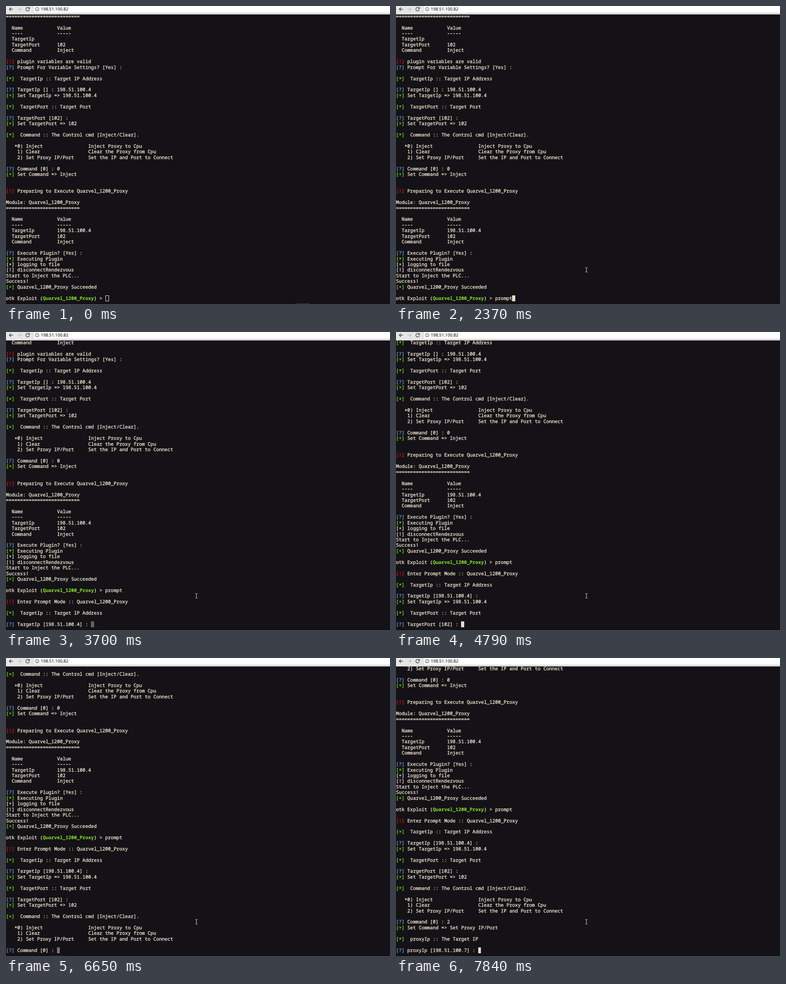
Recreate the animation shown at these times as an HTML page. Size 850 by 658 pixels, loop 8 s.

```html
<!DOCTYPE html>
<html lang="en">
<head>
<meta charset="utf-8">
<title>Terminal</title>
<style>
  html, body { margin: 0; width: 100%; height: 100%; overflow: hidden; background: #141216; }
  #stage { position: absolute; left: 0; top: 0; width: 850px; height: 658px; overflow: hidden; background: #141216; }
  #term, #caret {
    position: absolute;
    font: 500 10.46px/12.44px "Noto Sans Mono", "DejaVu Sans Mono", monospace;
    font-variant-ligatures: none;
    text-rendering: geometricPrecision;
    color: #f7ead6;
  }
  #term { left: 0; bottom: 6px; width: 850px; white-space: pre; -webkit-text-stroke: 0.3px currentColor; }
  .row { height: 12.44px; }
  .row b { color: #86e62f; font-weight: 700; -webkit-text-stroke: 0; }
  .row i { font-style: normal; position: relative; top: 1.6px; }
  .ask { color: #6ea3dc; }
  .good { color: #74e32c; }
  .warn { color: #d81616; }
  #caret { bottom: 6px; width: 6.4px; height: 13px; box-sizing: border-box; }
  #caret.idle { width: 8px; border: 1px solid #e8dccb; }
  #fill { width: 100%; height: 100%; background: #e8dccb; }
  #edge { position: absolute; left: 0; bottom: 0; width: 850px; height: 1px; background: #0a090b; }
  #tab { position: absolute; top: 0; width: 31px; height: 1px; }
  #mouse { position: absolute; left: -4px; top: -7px; }
  #bar { position: absolute; left: 0; top: 0; width: 850px; height: 19px; background: #e6e6e6; border-bottom: 1px solid #949494; box-sizing: border-box; }
  #field { position: absolute; left: 60px; top: -6px; width: 800px; height: 22px; background: #fff; border: 1px solid #cbcbcb; border-radius: 3px; box-sizing: border-box; }
  #bar svg { position: absolute; left: 0; top: 0; }
  #address { position: absolute; left: 77px; top: 0; font: 9.4px/14px "Open Sans", "Noto Sans", sans-serif; text-rendering: geometricPrecision; color: #1c1c1c; -webkit-text-stroke: 0.15px currentColor; }
</style>
</head>
<body>
<div id="stage">
  <div id="term"></div>
  <div id="caret"><div id="fill"></div></div>
  <div id="edge"><div id="tab"></div></div>
  <svg id="mouse" width="9" height="13" fill="none" stroke="#d8d8d8">
    <path d="M2 1.5H4M5 1.5H7M4.5 2V11M2 11.5H4M5 11.5H7"/>
  </svg>
  <div id="bar">
    <div id="field"></div>
    <svg width="76" height="18" fill="none" stroke="#484848" stroke-width="1.4">
      <path d="M15.5 7H7.5M11 3.3L7.3 7L11 10.7"/>
      <path stroke="#c2c2c2" d="M25.5 7H33.5M30 3.3L33.7 7L30 10.7"/>
      <path d="M51 4.4A4 4 0 1 0 51.7 8.2"/>
      <path fill="#484848" stroke="none" d="M52.6 2V6.4H48.2Z"/>
      <circle cx="69" cy="7" r="4" stroke-width="1"/>
      <path stroke-width="1.1" d="M69 6.4V9.4M69 4.4V5.5"/>
    </svg>
    <div id="address">198.51.100.82</div>
  </div>
</div>
<script>
const LOOP = 8000, STEP = 80;
const NAME = "Quarvel_1200_Proxy";
const IP = "198.51.100.4";
const RULE = "=".repeat(26);

const table = ip => `  Name            Value
  ----            -----
  TargetIp        ${ip}
  TargetPort      102
  Command         Inject
`;
const options = `[*]  Command :: The Control cmd [Inject/Clear].

   *0) Inject                Inject Proxy to Cpu
    1) Clear                 Clear the Proxy from Cpu
    2) Set Proxy IP/Port     Set the IP and Port to Connect
`;

// Each block ends in an input line; a leading ~ keeps the tag uncoloured.
const blocks = [
`${RULE}

${table("")}
[!] plugin variables are valid
[?] Prompt For Variable Settings? [Yes] :

[*]  TargetIp :: Target IP Address

[?] TargetIp [] : ${IP}
[+] Set TargetIp => ${IP}

[*]  TargetPort :: Target Port

[?] TargetPort [102] :
[+] Set TargetPort => 102

${options}
[?] Command [0] : 0
[+] Set Command => Inject


[!] Preparing to Execute ${NAME}

Module: ${NAME}
${RULE}

${table(IP)}
[?] Execute Plugin? [Yes] :
[*] Executing Plugin
~[+] logging to file
~[!] disconnectRendezvous
Start to Inject the PLC...
Success!
[+] ${NAME} Succeeded

otk Exploit (${NAME}) >`,
`
[!] Enter Prompt Mode :: ${NAME}

[*]  TargetIp :: Target IP Address

[?] TargetIp [${IP}] :`,
`[+] Set TargetIp => ${IP}

[*]  TargetPort :: Target Port

[?] TargetPort [102] :`,
`[+] Set TargetPort => 102

${options}
[?] Command [0] :`,
`[+] Set Command => Set Proxy IP/Port

[*]  proxyIp :: The Target IP

[?] proxyIp [198.51.100.7] :`
];

const screenTimes = [0, 2600, 3780, 4880, 7840];
const typing = {
  0: { text: "prompt", times: [1600, 1750, 1910, 2060, 2220, 2370] },
  3: { text: "2", times: [7190] }
};
// Caret changes: time, and whether it fades in, fades out or snaps on.
const blinks = [
  [1130, "in"], [1600, "on"], [2680, "out"], [3150, "in"], [3700, "out"], [3780, "on"],
  [4160, "out"], [4630, "in"], [5170, "out"], [5630, "in"], [6190, "out"],
  [6650, "in"], [7110, "out"], [7190, "on"], [7660, "out"], [7840, "on"]
];
const levels = { in: [0.5, 0.88, 1], out: [0.4, 0.1, 0], on: [1] };
const tagClass = { "!": "warn", "?": "ask", "*": "good", "+": "good" };

const $ = id => document.getElementById(id);
const term = $("term"), caret = $("caret"), fill = $("fill"), mouse = $("mouse"), tab = $("tab");

function markup(line) {
  if (line[0] === "~") return line.slice(1);
  return line
    .replace(/^\[([!?*+])\]/, (tag, c) => `<span class="${tagClass[c]}">${tag}</span>`)
    .replace("*", "<i>*</i>")
    .replace(`(${NAME})`, `(<b>${NAME}</b>)`);
}

const screens = blocks.map(block => {
  const el = document.createElement("div");
  const lines = block.split("\n");
  el.innerHTML = lines.map(l => `<div class="row">${markup(l)}</div>`).join("");
  const input = document.createElement("span");
  el.lastChild.append(" ", input);
  term.append(el);
  return { el, input, col: lines[lines.length - 1].length + 1 };
});

const passed = (times, t) => times.filter(x => x <= t).length;

function caretLevel(t) {
  const blink = blinks.filter(b => b[0] <= t).pop();
  if (!blink) return 0;
  const fade = levels[blink[1]];
  return fade[Math.min(fade.length - 1, Math.floor((t - blink[0]) / STEP))];
}

function drawMouse(t) {
  mouse.style.display = t < 190 ? "none" : "block";
  const step = Math.floor((t - 190) / STEP) + 1;
  const p = Math.max(0, Math.min(1, step / 7));
  const left = (1 - p) ** 2;
  const x = Math.round(421 + 370 * left), y = Math.round(583 + 92 * left);
  mouse.style.transform = `translate(${x}px, ${y}px)`;
  tab.style.left = t < 190 ? "641px" : "96px";
  tab.style.background = t < 190 ? "#454447" : "#252427";
}

function draw(t) {
  const current = passed(screenTimes, t) - 1;
  screens.forEach((s, i) => {
    s.el.style.display = i <= current ? "block" : "none";
    const keys = typing[i];
    const text = keys ? keys.text.slice(0, passed(keys.times, t)) : "";
    if (s.input.textContent !== text) s.input.textContent = text;
  });
  const { col, input } = screens[current];
  caret.style.left = `${col + input.textContent.length}ch`;
  caret.className = t < 1130 ? "idle" : "";
  fill.style.opacity = caretLevel(t);
  drawMouse(t);
}

const start = performance.now();
function tick() {
  draw((performance.now() - start) % LOOP);
  requestAnimationFrame(tick);
}
tick();
</script>
</body>
</html>
```
